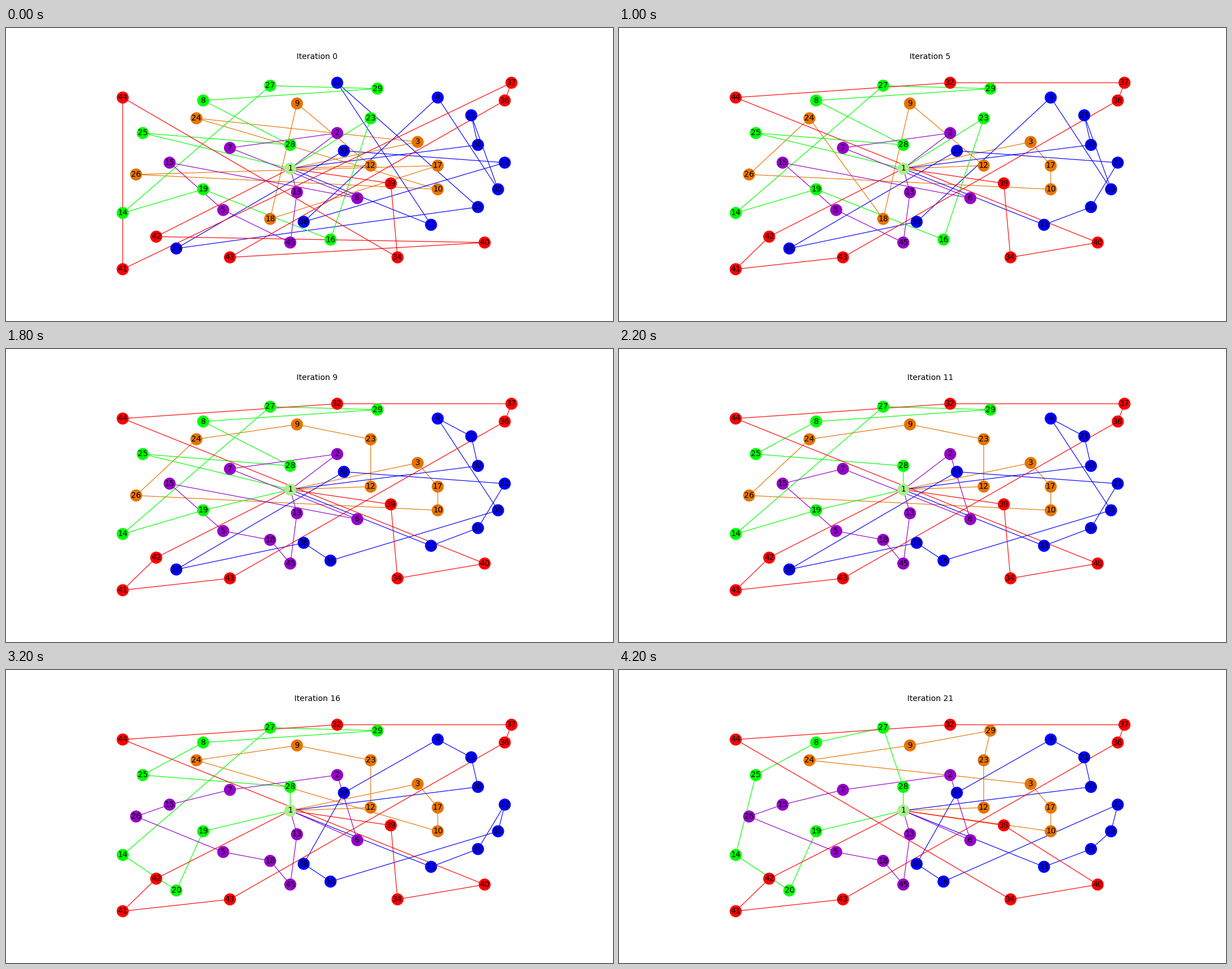
Write a matplotlib script that moves like this. It is 1078x520 px and loops after 4400 ms.

```python
import math
from itertools import combinations

import matplotlib.pyplot as plt
from matplotlib.animation import FuncAnimation
from matplotlib.collections import LineCollection

RED, GREEN, BLUE = "#ff0000", "#00ff00", "#0000ff"
ORANGE, PURPLE = "#e67300", "#9400c8"
DEPOT, DEPOT_POINT, DEPOT_COLOR = 1, (25, 34), "#aaf08c"
LAST_ITERATION = 21

# The problem: each vehicle's first tour, as stops on a grid in visiting order.
FIRST_TOURS = {
    ORANGE: {3: (44, 43), 24: (11, 51), 10: (47, 27), 26: (2, 32),
             17: (47, 35), 18: (22, 17), 9: (26, 56), 12: (37, 35)},
    BLUE: {30: (53, 42), 21: (52, 52), 35: (56, 27), 4: (47, 58),
           38: (27, 16), 22: (57, 36), 33: (33, 40), 20: (8, 7),
           31: (53, 21), 32: (32, 63), 11: (46, 15)},
    GREEN: {25: (3, 46), 28: (25, 42), 8: (12, 57), 29: (38, 61),
            27: (22, 62), 14: (0, 19), 19: (12, 27), 16: (31, 10),
            23: (37, 51)},
    RED: {39: (40, 29), 34: (41, 4), 44: (0, 58), 41: (0, 0), 37: (58, 63),
          36: (57, 57), 43: (16, 4), 40: (54, 9), 42: (5, 11)},
    PURPLE: {2: (32, 46), 7: (16, 41), 6: (35, 24), 15: (7, 36),
             5: (15, 20), 45: (25, 9), 13: (26, 26)},
}
POS = {DEPOT: DEPOT_POINT}
for tour in FIRST_TOURS.values():
    POS.update(tour)

# Iterations that hand a stop to another vehicle; all others swap two stops.
TRANSFERS = {1: (32, RED), 7: (18, PURPLE), 8: (23, ORANGE), 9: (16, BLUE),
             15: (20, GREEN), 16: (26, PURPLE), 17: (29, ORANGE)}


def legs(route):
    stops = [DEPOT, *route, DEPOT]
    return [(POS[a], POS[b]) for a, b in zip(stops, stops[1:])]


def length(route):
    return sum(math.dist(a, b) for a, b in legs(route))


def swapped(route, i, j):
    result = list(route)
    result[i], result[j] = result[j], result[i]
    return result


def transfer(routes, node, color):
    """Move a stop to its cheapest place in another vehicle's route."""
    routes = {c: [n for n in r if n != node] for c, r in routes.items()}
    route = routes[color]
    options = [route[:i] + [node] + route[i:] for i in range(len(route) + 1)]
    return {**routes, color: min(options, key=length)}


def best_swap(routes):
    """Exchange the two stops of one route that save the most distance."""
    options = [(color, swapped(route, i, j))
               for color, route in routes.items()
               for i, j in combinations(range(len(route)), 2)]
    color, route = min(options,
                       key=lambda o: length(o[1]) - length(routes[o[0]]))
    return {**routes, color: route}


def solve():
    history = [{color: list(tour) for color, tour in FIRST_TOURS.items()}]
    for iteration in range(1, LAST_ITERATION + 1):
        routes = history[-1]
        if iteration in TRANSFERS:
            history.append(transfer(routes, *TRANSFERS[iteration]))
        else:
            history.append(best_swap(routes))
    return history


def padded(values, margin=0.105):
    low, high = min(values), max(values)
    pad = margin * (high - low)
    return low - pad, high + pad


HISTORY = solve()
DPI = 84
plt.rcParams["font.family"] = "DejaVu Sans"
fig, ax = plt.subplots(figsize=(1078 / DPI, 520 / DPI), dpi=DPI)
xs, ys = zip(*POS.values())
ax.set_axis_off()
ax.set_xlim(padded(xs))
ax.set_ylim(padded(ys))

edges = LineCollection([], linewidths=1, zorder=1, snap=False)
ax.add_collection(edges, autolim=False)
nodes = ax.scatter(xs, ys, s=300, zorder=2)
for node, (x, y) in POS.items():
    ax.text(x, y, str(node), size=12, ha="center", va="center", zorder=3)
title = ax.set_title("", size=12)


def update(iteration):
    routes = HISTORY[iteration]
    node_colors = {DEPOT: DEPOT_COLOR}
    segments, edge_colors = [], []
    for color, route in routes.items():
        node_colors.update(dict.fromkeys(route, color))
        segments += legs(route)
        edge_colors += [color] * (len(route) + 1)
    edges.set_segments(segments)
    edges.set_color(edge_colors)
    nodes.set_color([node_colors[node] for node in POS])
    title.set_text(f"Iteration {iteration}")
    return edges, nodes, title


anim = FuncAnimation(fig, update, frames=len(HISTORY), interval=200,
                     repeat=True, repeat_delay=0)
plt.show()
```
